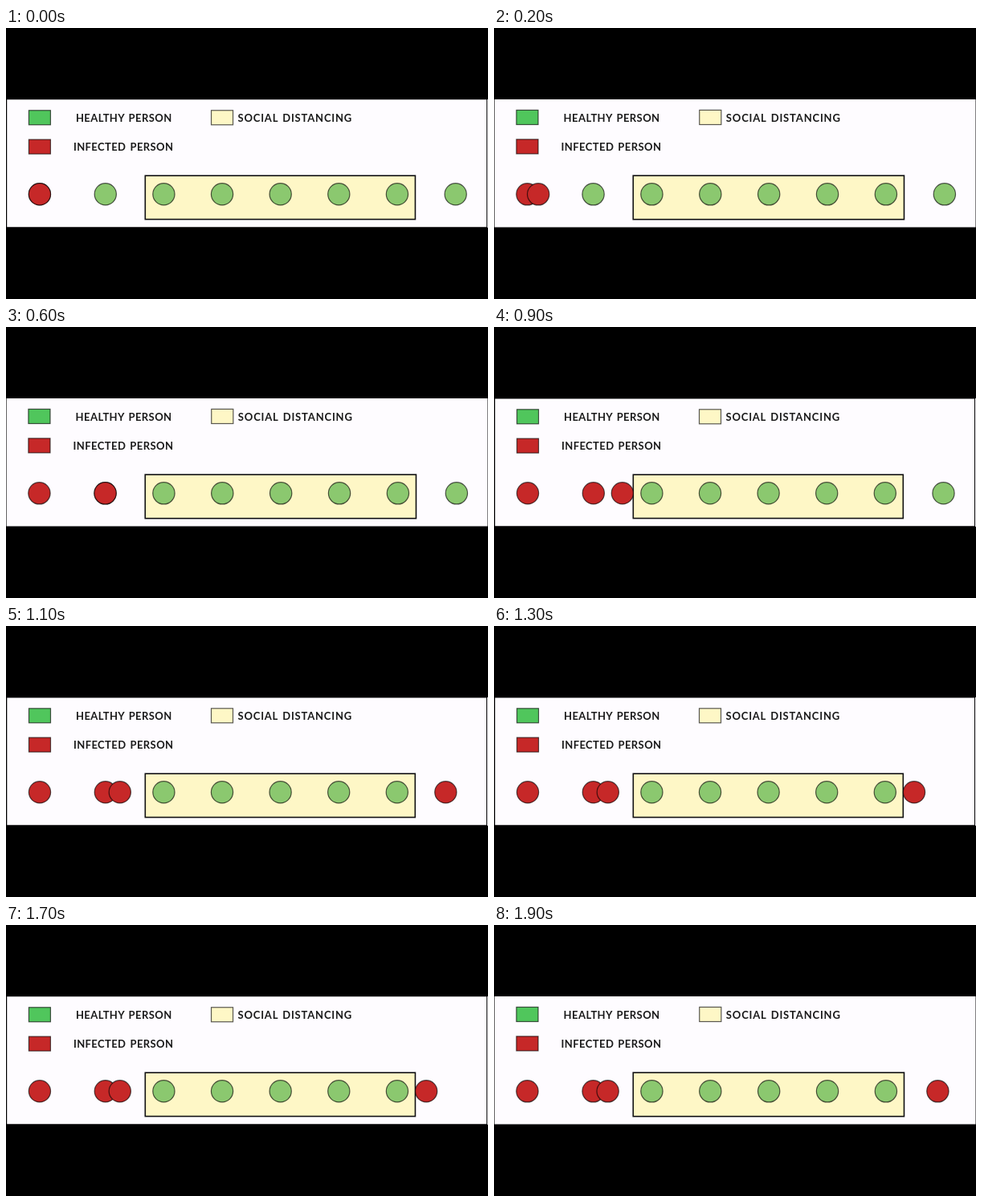
These frames come from a looping animation (600 by 338 pixels, 2000 ms). An HTML page:

```html
<!DOCTYPE html>
<html lang="en">
<head>
<meta charset="utf-8">
<title>Social distancing</title>
<style>
  html, body { margin: 0; width: 100%; height: 100%; overflow: hidden; background: #000; }
  svg { display: block; width: 100%; height: 100%; }
  text { font: 700 13px Lato, sans-serif; letter-spacing: .4px; word-spacing: 1.5px; fill: #1a1a1a; }
  circle, .key { stroke: #000; stroke-opacity: .65; stroke-width: 1.2; }
  .healthy { fill: #8bc86f; }
  .infected { fill: #c62828; }
  .distanced { fill: #fef7c6; }
</style>
</head>
<body>
<svg viewBox="0 0 600 338">
  <g id="scene">
    <path d="M1.3 89.4H598V248.3H1.3ZM599 89h1V249h-1Z" fill="#fefcff"/>
    <rect class="key" x="28.5" y="102.8" width="27" height="18" fill="#50c65c"/>
    <rect class="key infected" x="28.5" y="139.1" width="27" height="18"/>
    <rect class="key distanced" x="255.5" y="102.8" width="27" height="18"/>
    <text x="87" y="117">HEALTHY PERSON</text>
    <text x="84" y="153">INFECTED PERSON</text>
    <text x="288.5" y="117" style="letter-spacing:.8px">SOCIAL DISTANCING</text>
    <rect class="distanced" x="173.3" y="184.2" width="336" height="54.4" stroke="#111" stroke-width="1.6"/>
    <g id="people"></g>
  </g>
</svg>
<script>
const LOOP = 2000, STEP = 100;
const HOME = 42, NEAR = 123.8, FAR = 559.5, SPACING = 72.6, ROW = 207.3;
const people = document.getElementById('people');
const scene = document.getElementById('scene');

function addPerson(x, state) {
  const dot = document.createElementNS('http://www.w3.org/2000/svg', 'circle');
  dot.setAttribute('cx', x);
  dot.setAttribute('cy', ROW);
  dot.setAttribute('r', 13.6);
  dot.setAttribute('class', state);
  people.append(dot);
  return dot;
}

addPerson(HOME, 'infected');
const neighbour = addPerson(NEAR, 'healthy');
for (let i = 1; i <= 5; i++) addPerson(NEAR + i * SPACING, 'healthy');
const outsider = addPerson(FAR, 'healthy');
const carrier = addPerson(HOME, 'infected');

// Progress from 0 to 1 between two times.
const ramp = (t, from, to) => Math.min(1, Math.max(0, (t - from) / (to - from)));
const stateAt = (t, infectedFrom) => t < infectedFrom ? 'healthy' : 'infected';

function draw(now) {
  const t = Math.floor(now % LOOP / STEP) * STEP;

  // Both movers run up to the distanced group and turn back at its edge.
  carrier.setAttribute('cx', HOME + (NEAR - HOME) * ramp(t, 120, 600)
    + 36 * ramp(t, 600, 900) - 18 * ramp(t, 900, 1050));
  outsider.setAttribute('cx', FAR + 36.5 * (ramp(t, 1700, 1960) - ramp(t, 1000, 1300)));

  neighbour.setAttribute('class', stateAt(t, 500));
  outsider.setAttribute('class', stateAt(t, 1000));

  // Slight camera swell.
  const zoom = 1 + .005 * Math.max(0, Math.cos(2 * Math.PI * (t - 400) / 1700));
  scene.setAttribute('transform',
    `translate(190 ${ROW}) scale(${zoom}) translate(-190 ${-ROW})`);
}

const start = performance.now();
function tick() {
  draw(performance.now() - start);
  requestAnimationFrame(tick);
}
tick();
</script>
</body>
</html>
```
